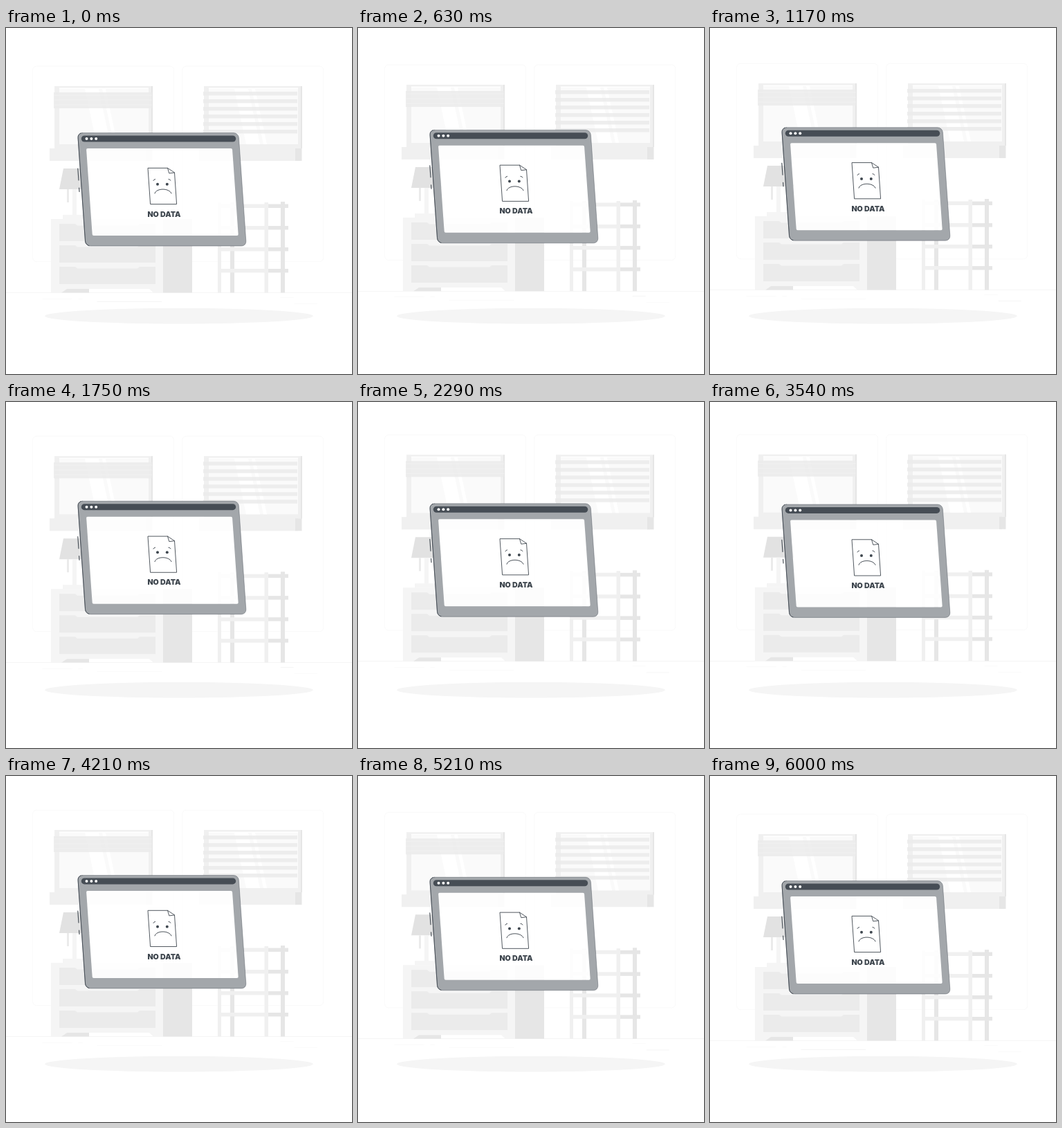
An HTML page that plays this animation: 500 px wide and 500 px high, repeating every 6040 ms.

```html
<!DOCTYPE html>
<html lang="en">
<head>
<meta charset="utf-8">
<title>No data</title>
<style>
  html, body { margin: 0; width: 100%; height: 100%; overflow: hidden; background: #fff; }
  svg { display: block; width: 100%; height: 100%; }
  text { font: 900 10.7px Inter, "Open Sans", sans-serif; text-anchor: middle; }
  .pale { fill: #f5f5f5; }
  .light { fill: #f0f0f0; }
  .mid { fill: #ebebeb; }
  .dark { fill: #e6e6e6; }
  .line { fill: none; stroke: #3f474f; stroke-linecap: round; stroke-linejoin: round; }
</style>
</head>
<body>
<svg viewBox="0 0 500 500">
  <defs>
    <g id="window">
      <path class="light" d="M70 84H212V174H70zM63 174H206V192H63z"/>
      <path class="dark" d="M210 84h2v90h-2zM202 174h9.5v18h-9.5z"/>
      <path fill="#fafafa" d="M77 88H206V168H77z"/>
      <path fill="#fff" d="M114 88h20l17 80h-20zM139 88h5l17 80h-5z"/>
      <path fill="#fff" d="M77 86.5H206V88H77z"/>
    </g>
  </defs>

  <g id="room">
    <g fill="none" stroke="#f8f8f8" stroke-width=".8">
      <rect x="38.6" y="55.2" width="204" height="282.4" rx="5.5"/>
      <rect x="254.7" y="55.2" width="204" height="282.4" rx="5.5"/>
    </g>
    <path class="mid" d="M0 382.2h500v.5H0zM416.8 398.5h33v.3h-33zM396.6 389.2h19v.3h-19zM52.5 390.9h43v.3h-43zM104.6 390.9h6v.3h-6zM131.5 395.1h93.7v.3h-93.7z"/>

    <use href="#window"/>
    <path class="mid" opacity=".85" d="M69 93H211V116H69z"/>
    <path stroke="#f1f1f1" d="M69 97H211M69 104H211M69 111H211"/>
    <use href="#window" x="216"/>
    <g id="slats" class="mid"></g>

    <path fill="#e2e2e2" d="M83 203H116L122 233H77z"/>
    <path class="mid" d="M88 233h3v19h-3z"/>
    <path class="pale" d="M96 233h6v37h-6zM82 270h34v6H82z"/>

    <path class="dark" d="M227 276h42v106.4h-42z"/>
    <path class="pale" d="M65 276H227V382.4H213L207 377H88L80 382.4H65z"/>
    <path class="dark" d="M88 377h32v5.4H80z"/>
    <g id="drawers" class="mid"></g>

    <path class="dark" d="M324 252h6v130.4h-6zM397 251h6v131.4h-6z"/>
    <g id="shelves"></g>
    <path class="light" d="M306 252h5v130.4h-5zM373.5 252h5.5v130.4h-5.5z"/>
  </g>

  <ellipse class="pale" cx="250" cy="416.2" rx="193.9" ry="11.3"/>

  <g id="screen">
    <g transform="skewX(4)">
      <rect x="103.8" y="174" width="211" height="126" fill="#fff" opacity=".88"/>
      <path fill="#a3a7ab" fill-rule="evenodd" d="M100 151.6h218.3a7 7 0 0 1 7 7v149.4a7 7 0 0 1-7 7H100a7 7 0 0 1-7-7V158.6a7 7 0 0 1 7-7zM105.8 174h207a2 2 0 0 1 2 2v122a2 2 0 0 1-2 2h-207a2 2 0 0 1-2-2V176a2 2 0 0 1 2-2z"/>
      <rect class="line" x="93" y="151.6" width="232.3" height="163.4" rx="7" stroke-width=".4"/>
      <path class="line" stroke-width=".9" d="M98 151.8a7 7 0 0 0-5 6.8V308a7 7 0 0 0 5 6.6"/>
    </g>
    <rect x="108.8" y="155.5" width="223.4" height="9" rx="4.5" fill="#464d55"/>
    <g fill="#fff">
      <circle cx="116.5" cy="160" r="2"/>
      <circle cx="123.4" cy="160" r="2"/>
      <circle cx="130.2" cy="160" r="2"/>
    </g>
    <path class="line" stroke-width="1.1" d="M103.8 203L105 220M105.6 231L106 236.5"/>
    <path class="line" stroke-width=".9" d="M205.4 202.4H233.5L243.5 209L246.6 254.6H209zM233.5 202.4L235.8 210L243.5 209"/>
    <path class="line" d="M213 220.5Q213.8 218.8 215.5 218.5M235 218.5Q237 218.8 238 220.3M215 239C217 231 236 231 239 239"/>
    <g fill="#3f474f">
      <circle cx="219" cy="225.7" r="2"/>
      <circle cx="232.8" cy="225.7" r="2"/>
      <text x="228.5" y="272.6">NO DATA</text>
    </g>
  </g>
</svg>
<script>
const el = id => document.getElementById(id);
const repeat = (id, ys, draw) => { el(id).innerHTML = ys.map(draw).join(""); };

repeat("slats", [92, 103, 114, 125, 136, 147], y =>
  `<path opacity=".85" d="M285 ${y}H421v5.5H285z"/>`);
repeat("drawers", [283, 314, 345], y =>
  `<path d="M77 ${y}H100l3 2.5H190l3-2.5H216v25H77z"/>`);
repeat("shelves", [254.5, 286, 317, 348], y =>
  `<path class="light" d="M306 ${y}h73v5.5h-73z"/><path class="dark" d="M379 ${y}h29v5.5h-29z"/>`);

// Linear rise of 10 units and back once per period
const rise = (t, period) => {
  const p = t % period / period;
  return 20 * Math.min(p, 1 - p);
};
const lift = (id, y) => el(id).setAttribute("transform", `translate(0 ${-y})`);

const start = performance.now();
function frame() {
  const t = (performance.now() - start) % 6040;
  lift("room", rise(t, 6000));
  lift("screen", rise(t, 3000));
  requestAnimationFrame(frame);
}
frame();
</script>
</body>
</html>
```
